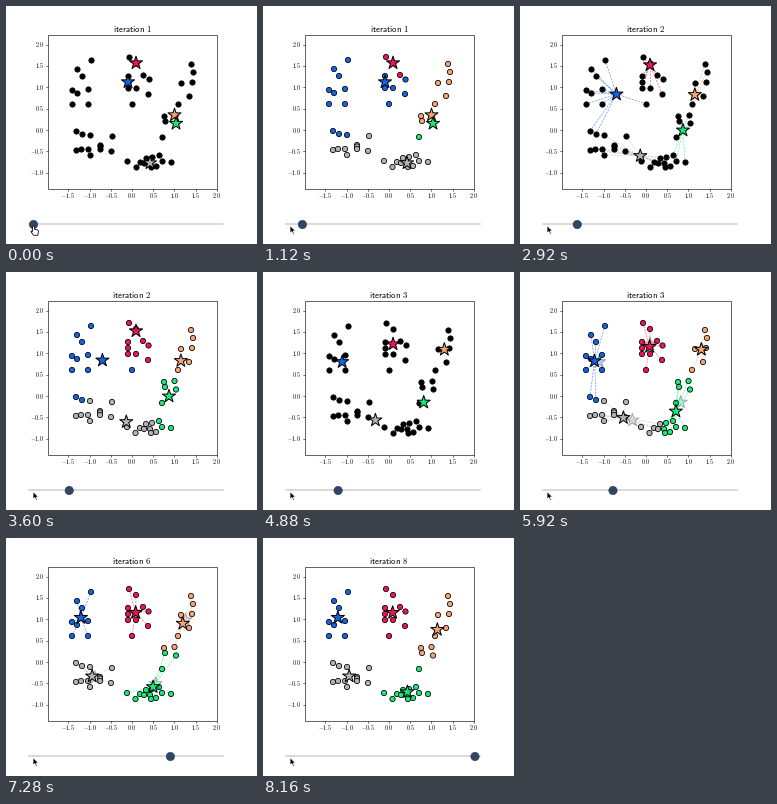
Write a matplotlib script that moves like this. It is 251 px wide and 238 px high and loops after 8.2 s.

```python
import matplotlib.pyplot as plt
import numpy as np
from matplotlib.animation import FuncAnimation
from matplotlib.collections import LineCollection
from matplotlib.patches import Circle, Polygon, Rectangle

W, H, DPI = 251, 238, 100
PX = 72 / DPI  # points per pixel
FRAMES, INTERVAL = 205, 40
ITERATIONS, STEPS = 8, 4
LAST = ITERATIONS * STEPS - 1

plt.rcParams["mathtext.fontset"] = "cm"

# Sample positions on the stage, in pixels.
POINTS = np.array([
    (85, 54), (71, 63), (76, 70), (66, 84), (71, 87), (82, 83), (66, 98), (82, 98),
    (123, 51), (130, 57), (122, 70), (137, 69), (142.5, 73.5), (122, 76), (122, 82),
    (130, 82), (142, 88), (126, 98),
    (185, 58), (187, 66), (175, 77), (186, 76), (183, 90), (172, 98), (158, 110),
    (168.5, 109), (159, 115), (170, 117.5),
    (156, 131), (121, 155), (129.5, 161), (134, 156), (138, 157), (140, 152), (146, 151),
    (153, 149), (144, 157), (145, 161), (150, 160), (156, 155), (165, 156),
    (70, 125), (76, 128), (84, 129), (106, 130), (70, 144), (75, 143), (82, 143),
    (84, 149), (94, 139), (94, 140.5), (94, 143), (105, 145),
])
SEEDS = np.array([(130, 57), (122, 76), (168.5, 109), (170, 117.5), (144, 157)])
COLORS = np.array(["#f01455", "#1464e6", "#f8a373", "#14eb78", "#b4b4b4"])


def kmeans():
    """Return (centers, labels, moved centers) for each iteration."""
    rounds, centers = [], SEEDS
    for _ in range(ITERATIONS):
        dist = np.linalg.norm(POINTS[:, None] - centers[None], axis=2)
        labels = dist.argmin(axis=1)
        moved = np.array([POINTS[labels == k].mean(axis=0) for k in range(len(centers))])
        rounds.append((centers, labels, moved))
        centers = moved
    return rounds


ROUNDS = kmeans()

# Frames at which the slider advances: slow single steps, then a steady run.
SLOW = [7, 18, 32, 48, 68, 86, 100, 114, 128, 136, 143, 149, 155, 160, 164]
STARTS = np.array(SLOW + [164 + 2.1 * k for k in range(1, LAST - len(SLOW) + 1)])

# The small surplus keeps the pixel size from rounding down.
fig = plt.figure(figsize=((W + 0.01) / DPI, (H + 0.01) / DPI), dpi=DPI, facecolor="white")
ax = fig.add_axes([0, 0, 1, 1])
ax.set(xlim=(0, W), ylim=(H, 0))
ax.axis("off")


def draw_frame():
    left, right, top, bottom = 41.5, 210.5, 29.5, 183.5
    ax.add_patch(Rectangle((left, top), right - left, bottom - top,
                           fill=False, ec="black", lw=0.6 * PX))
    style = dict(color="black", lw=0.5 * PX)
    for v in np.arange(-1.5, 2.1, 0.5):
        x = 126 + 42.4 * v
        ax.plot([x, x], [bottom, bottom + 1.8], **style)
        ax.text(x, 189.5, f"${v:.1f}$", size=6 * PX, ha="center", va="center")
    for v in np.arange(-1, 2.1, 0.5):
        y = 124 - 42.7 * v
        ax.plot([left - 1.8, left], [y, y], **style)
        ax.text(38.3, y, f"${v:.1f}$", size=6 * PX, ha="right", va="center")


def stars(alpha, zorder):
    return ax.scatter(*SEEDS.T, marker="*", s=(13.8 * PX) ** 2, c=COLORS,
                      ec="black", lw=1.0 * PX, alpha=alpha, zorder=zorder)


def shape(points, fc, ec):
    patch = Polygon(np.array(points) + (26.5, 219), closed=True, fc=fc, ec=ec,
                    lw=0.8 * PX, zorder=12)
    return ax.add_patch(patch)


draw_frame()
title = ax.text(126, 26, "", size=8.8 * PX, ha="center", va="baseline")
links = LineCollection([], lw=0.7 * PX, linestyles=(0, (3, 1.6)), alpha=0.65, zorder=3)
ax.add_collection(links)
dots = ax.scatter(*POINTS.T, s=(5.3 * PX) ** 2, c="black", ec="black",
                  lw=0.8 * PX, zorder=4)
ghosts = stars(0.3, 5)
heads = stars(1, 6)

ax.plot([23, 216.5], [218.5, 218.5], color="#d2d2d2", lw=1.6 * PX, zorder=8)
knob = ax.add_patch(Circle((27.5, 218.5), 4.2, fc="#2f4667", ec="#22344f",
                           lw=0.5 * PX, zorder=9))
arrow = shape([(0.5, 0.5), (0.5, 8.2), (2.3, 6.6), (3.6, 9.4), (4.9, 8.8),
               (3.7, 6.1), (6.2, 6.1)], "black", "white")
hand = shape([(0, 1.5), (1, 0.8), (2, 1.5), (2, 4.2), (5.2, 5), (6, 6), (5.3, 10.3),
              (1, 10.3), (-1.6, 6.6), (-1, 5.8), (0, 6.6)], "white", "black")


def update(frame):
    state = int(np.searchsorted(STARTS, frame, side="right"))
    turn, step = divmod(state, STEPS)
    centers, labels, moved = ROUNDS[turn]
    moving = step == 3 and state < LAST
    target = moved if step == 3 else centers

    title.set_text(rf"$\mathsf{{iteration\ {turn + 1}}}$")
    dots.set_facecolor(COLORS[labels] if step >= 2 else "black")
    heads.set_offsets(target)
    ghosts.set_offsets(centers)
    ghosts.set_visible(moving)
    links.set_segments(np.stack([POINTS, target[labels]], axis=1))
    links.set_color(COLORS[labels])
    links.set_visible(step == 1 or moving)
    knob.center = (27.5 + 184.5 * state / LAST, 218.5)
    hand.set_visible(state == 0)
    arrow.set_visible(state > 0)
    return title, dots, heads, ghosts, links, knob, hand, arrow


anim = FuncAnimation(fig, update, frames=FRAMES, interval=INTERVAL,
                     repeat=True, repeat_delay=0)
plt.show()
```
